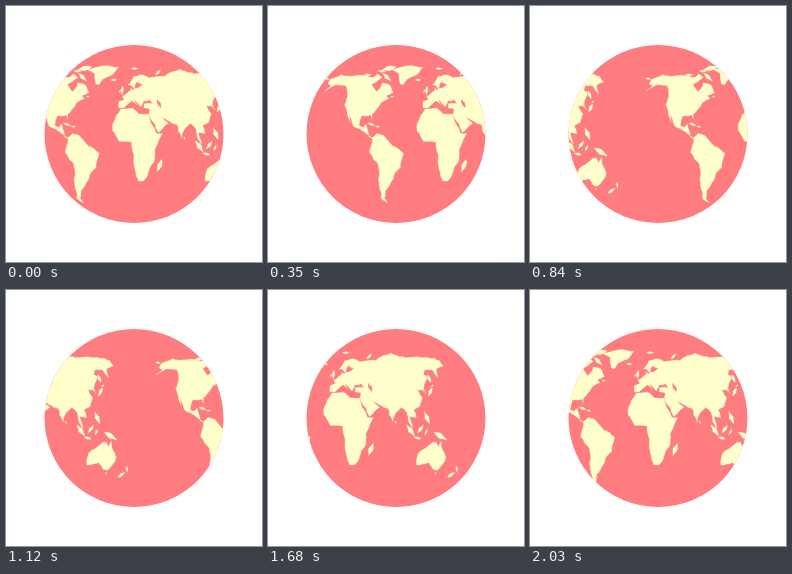
An HTML page for the animation above (2.1 s loop, 256 px wide and 256 px high).

```html
<!DOCTYPE html>
<html lang="en">
<head>
<meta charset="utf-8">
<title>Turning globe</title>
<style>
  html, body { margin: 0; width: 100%; height: 100%; overflow: hidden; background: #fff; }
  svg { display: block; width: 100vw; height: 100vh; }
  .sea { fill: #ff7c80; }
  .land { fill: #ffffcc; stroke: #ffffcc; stroke-width: .3; stroke-linejoin: round; }
</style>
</head>
<body>
<svg viewBox="0 0 256 256">
  <defs>
    <clipPath id="disc"><ellipse cx="128" cy="128" rx="89.5" ry="89"/></clipPath>
    <g id="map"><path id="land" class="land"/><path id="lake" class="sea"/></g>
  </defs>
  <ellipse class="sea" cx="128" cy="128" rx="89.5" ry="89"/>
  <g clip-path="url(#disc)">
    <g id="scroll"><use href="#map"/><use id="repeat" href="#map"/></g>
  </g>
</svg>
<script>
const LOOP = 2100, STEP = 70, WIDTH = 254;
const byId = id => document.getElementById(id);

// Key headlands and bays as "longitude,latitude"; the coast between them is generated.
const continents = {
  africa: "-17,15 -16,23 -6,36 10,37 20,31 33,31 36,22 43,12 51,12 40,-4 40,-15 35,-20 32,-28 26,-34 19,-34 12,-17 9,0 9,4 -8,4.5",
  eurasia: "-9,37 -9,43 -1,45 -4,48.5 8,54 10,57 11,54.5 22,57 29,60 21,62 25,65.5 17,61 15,56 11,59 5,60 15,69 28,71 41,67 34,66 44,68 68,69 80,73 104,78 113,74 140,73 180,69 178,63 163,60 157,51 155,59 143,59 137,54 141,52 128,40 129,35 125,39 118,39 122,31 116,23 107,20 109,12 100,13 103,2 98,9 97,17 91,22 80,15 77,8 72,21 57,26 49,30 55,25 60,22 45,13 34,29 36,36 27,37 28,41 41,41 38,45 28,44 23,38 13,45 18,40 10,44 -2,37",
  northAmerica: "-168,66 -156,71 -128,70 -96,68 -93,72 -82,68 -94,60 -82,53 -78,57 -78,62 -65,60 -56,52 -66,49 -61,46 -70,43 -76,36 -81,31 -80,26 -83,30 -96,29 -97,20 -91,18 -87,21 -84,15 -82,9 -78,8 -86,12 -105,20 -113,31 -110,23 -117,33 -124,40 -124,48 -135,59 -150,60 -164,54 -158,59 -166,61",
  southAmerica: "-78,8 -72,12 -62,10 -50,0 -35,-7 -40,-21 -48,-26 -57,-37 -65,-43 -69,-51 -66,-55 -74,-51 -73,-38 -70,-18 -81,-6 -77,4",
  australia: "114,-22 115,-34 124,-33 131,-31.5 140,-38 147,-39 153,-31 153,-26 146,-19 142.5,-11 140,-17.5 136,-12 131,-12 122,-18",
  greenland: "-73,78 -55,73 -48,61 -43,60 -38,66 -22,71 -13,81 -33,83.5"
};
// Islands are lens shapes, each given by its two ends.
const islands = {
  arctic: "-85,73 -64,64 / -117,70 -102,71 / -88,77 -66,82 / -95,76 -81,75 / -24,65 -14,65 / 12,79 25,79 / 54,71 67,77 / -180,67 -170,66",
  atlantic: "-5,50 -4,58.5 / -9,52 -7,55 / -59,48 -53,48 / -85,22 -75,20 / -74,19 -68,18.5 / 45,-25 50,-13",
  pacific: "80,9 81,6 / 131,33 141,41 / 140,42 145,44 / 142,46 143,54 / 121,18 126,6 / 95,5 106,-6 / 105,-7 115,-8.5 / 110,-3 118,5 / 120,-5 123,1",
  southern: "132,-2 150,-10 / 145,-41 148,-43 / 173,-35 177,-41 / 167,-46 174,-41"
};

// Pseudocylindrical projection: meridians draw together towards the poles.
function project(point) {
  const [lon, lat] = point.split(",").map(Number);
  const phi = lat * Math.PI / 180;
  return [
    119 + 0.74 * lon * (1 - 0.155 * phi ** 2),
    140 - 59 * (phi - 0.007 * phi ** 7)
  ];
}
const points = text => text.trim().split(" ").map(project);

let seed = 7;
function random() {
  seed = (seed * 16807) % 2147483647;
  return seed / 2147483647;
}

// A point beside the middle of a-b, offset by a share of the length.
function beside([ax, ay], [bx, by], share) {
  return [(ax + bx) / 2 - (by - ay) * share, (ay + by) / 2 + (bx - ax) * share];
}

// Midpoint displacement turns a straight edge into a coast.
function roughen(a, b) {
  if (Math.hypot(b[0] - a[0], b[1] - a[1]) < 3) return [a];
  const middle = beside(a, b, (random() - 0.5) * 0.16);
  return [...roughen(a, middle), ...roughen(middle, b)];
}
function outline(corners) {
  const coast = corners.flatMap((p, i) => roughen(p, corners[(i + 1) % corners.length]));
  return "M" + coast.map(p => p.map(n => n.toFixed(2)).join(" ")).join("L") + "Z";
}
function lens(ends) {
  const [a, b] = points(ends);
  return outline([a, beside(a, b, 0.17), b, beside(a, b, -0.17)]);
}

byId("land").setAttribute("d", [
  ...Object.values(continents).map(text => outline(points(text))),
  ...Object.values(islands).flatMap(group => group.split("/").map(lens))
].join(""));
byId("lake").setAttribute("d", lens("48,46 52,37"));
byId("repeat").setAttribute("x", -WIDTH);

function draw(time) {
  const step = Math.floor((time % LOOP) / STEP);
  const shift = step * STEP / LOOP * WIDTH;
  byId("scroll").setAttribute("transform", `translate(${shift.toFixed(2)} 0)`);
}
function tick() {
  draw(performance.now());
  requestAnimationFrame(tick);
}
tick();
</script>
</body>
</html>
```
